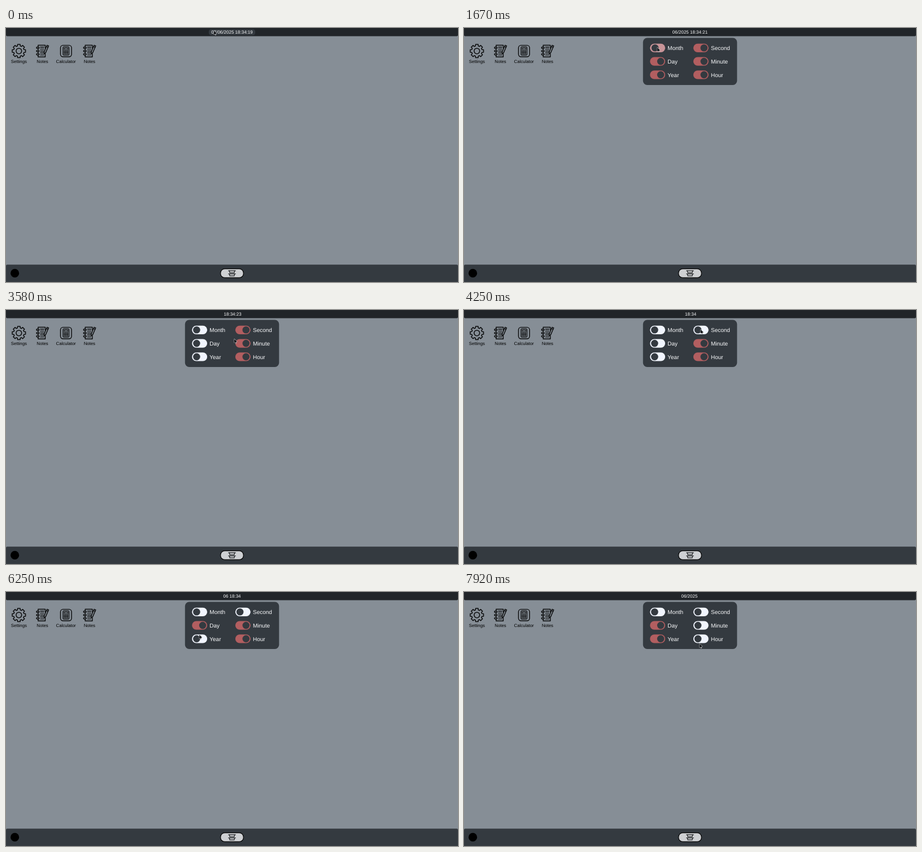
Animation, 800 px wide and 450 px high, one loop 8000 ms. Source, as an HTML page with a canvas:

```html
<!DOCTYPE html>
<html lang="en">
<head>
<meta charset="utf-8">
<title>Desktop clock settings</title>
<style>
html, body { margin: 0; width: 100%; height: 100%; overflow: hidden; background: #868e96; }
canvas { display: block; width: 800px; height: 450px; }
</style>
</head>
<body>
<canvas id="stage"></canvas>
<script>
const LOOP = 8000, FRAMES = 96, STEP = LOOP / FRAMES;
const FONT = 'px "Liberation Sans", Arial, sans-serif';
const DESK = '#868e96', BAR = '#343a40', TOP = '#212529', INK = '#090a0b', PALE = '#f8f9fa';
const ON = [178, 94, 96], OFF = [241, 245, 254];
const PANEL_OPEN = 160;

const canvas = document.getElementById('stage');
const ctx = canvas.getContext('2d');
const dpr = window.devicePixelRatio || 1;
canvas.width = 800 * dpr;
canvas.height = 450 * dpr;

// Every switch starts on and flips at its click times.
const clicks = { Month: [1570], Day: [2170, 5600], Year: [2830, 6550], Second: [3950], Minute: [7150], Hour: [7620] };
const switches = Object.entries(clicks).map(([name, flips], i) => ({
  name, flips,
  x: 329.2 + Math.floor(i / 3) * 76.7,
  y: 35.3 + (i % 3) * 23.8
}));

// The pointer goes from the clock to each click in turn, then leaves the panel.
const stops = [
  { t: 380, x: 368, y: 5 },
  ...switches.flatMap(s => s.flips.map(t => ({ t, x: s.x + 13, y: s.y - 0.5 }))),
  { t: LOOP, x: 417, y: 92 }
].sort((a, b) => a.t - b.t);

const clamp = v => Math.max(0, Math.min(1, v));
const smooth = v => v * v * (3 - 2 * v);
const mix = (a, b, k) => a + (b - a) * k;

// Rests after a click, travels in the middle of the gap; height lags behind.
function pointer(t) {
  const next = Math.max(1, stops.findIndex(s => s.t > t));
  const a = stops[next - 1], b = stops[next];
  const k = smooth(clamp(((t - a.t) / (b.t - a.t) - 0.45) / 0.31));
  return [mix(a.x, b.x, k), mix(a.y, b.y, k * k)];
}

const isOn = (s, t) => s.flips.filter(f => f <= t).length % 2 === 0;

// 1 is on, 0 is off
function level(s, t, duration) {
  const last = s.flips.filter(f => f <= t).pop();
  if (last === undefined) return 1;
  const k = smooth(clamp((t - last) / duration));
  return isOn(s, t) ? k : 1 - k;
}

function clockText(t) {
  const [month, day, year, second, minute, hour] = switches.map(s => isOn(s, t));
  const sec = 19 + Math.floor((t + 750) / 1000);
  const date = [month && '07', day && '06', year && '2025'].filter(Boolean).join('/');
  const time = [hour && '18', minute && '34', second && sec].filter(Boolean).join(':');
  return date + ' ' + time;
}

function text(str, x, y, size, color, align) {
  ctx.font = size + FONT;
  ctx.textRendering = 'geometricPrecision';
  ctx.textAlign = align;
  ctx.fillStyle = color;
  ctx.fillText(str, x, y);
}

function box(x, y, w, h, r, fill, stroke) {
  ctx.beginPath();
  ctx.roundRect(x, y, w, h, r);
  if (fill) { ctx.fillStyle = fill; ctx.fill(); }
  if (stroke) { ctx.strokeStyle = stroke; ctx.stroke(); }
}

function dot(x, y, r, color) {
  ctx.beginPath();
  ctx.arc(x, y, r, 0, Math.PI * 2);
  ctx.fillStyle = color;
  ctx.fill();
}

function line(...p) {
  ctx.beginPath();
  for (let i = 0; i < p.length; i += 2) ctx.lineTo(p[i], p[i + 1]);
  ctx.stroke();
}

function gear() {
  const teeth = 8, half = Math.PI / teeth;
  ctx.lineWidth = 1.5;
  ctx.beginPath();
  for (let i = 0; i < teeth * 2; i++) {
    const tip = i % 2 === 0;
    const r = tip ? 12 : 9.3, spread = tip ? 0.19 : 0.12;
    for (const side of [-1, 1]) {
      const a = i * half + side * spread;
      ctx.lineTo(Math.sin(a) * r, -Math.cos(a) * r);
    }
  }
  ctx.closePath();
  ctx.stroke();
  ctx.beginPath();
  ctx.arc(0, 0, 4.9, 0, Math.PI * 2);
  ctx.stroke();
}

function notes() {
  ctx.lineWidth = 1.4;
  line(5, -5, 5, -10.3, -7.7, -10.3, -7.7, 10.5, 5, 10.5, 5, 5);
  for (let i = -1; i <= 1; i++) box(-10.6, i * 5.8 - 1.2, 4.8, 2.4, 1.2, DESK, INK);
  for (let i = -2; i <= 2; i++) line(-3.6, i * 3.4, 2.6, i * 3.4);
  pencil();
}

function pencil() {
  ctx.save();
  ctx.translate(3.2, 5);
  ctx.rotate(0.41);
  ctx.fillStyle = DESK;
  ctx.beginPath();
  ctx.moveTo(0, 0);
  ctx.lineTo(-1.5, -3);
  ctx.lineTo(-1.5, -16);
  ctx.lineTo(1.5, -16);
  ctx.lineTo(1.5, -3);
  ctx.closePath();
  ctx.fill();
  ctx.stroke();
  line(-1.5, -13.4, 1.5, -13.4);
  ctx.restore();
}

function calculator() {
  ctx.lineWidth = 1.4;
  box(-9.7, -10.2, 19.6, 20.4, 4.5, null, INK);
  ctx.lineWidth = 1.2;
  box(-5.3, -7.4, 10.7, 14.8, 1.8, null, INK);
  box(-3.3, -5.3, 6.8, 2.5, 0.6, null, INK);
  for (let i = 0; i < 9; i++)
    box(-3.9 + (i % 3) * 2.8, -1.2 + Math.floor(i / 3) * 2.5, 2.2, 1.9, 0.5, INK);
}

const icons = [['Settings', gear], ['Notes', notes], ['Calculator', calculator], ['Notes', notes]];

function desktop() {
  ctx.fillStyle = DESK;
  ctx.fillRect(0, 0, 800, 450);
  ctx.lineCap = ctx.lineJoin = 'round';
  icons.forEach(([name, draw], i) => {
    const x = 22.8 + i * 41.67;
    ctx.save();
    ctx.translate(x, 40.8);
    ctx.strokeStyle = INK;
    draw();
    ctx.restore();
    text(name, x, 61.7, 7.8, '#000', 'center');
  });
  box(0, -4, 800, 18.5, 2.1, TOP);
  box(0, 419.2, 800, 36, 2.1, BAR);
  dot(15.6, 434.4, 7.6, '#000');
  dock();
}

function dock() {
  ctx.lineWidth = 1.2;
  box(379.7, 426.7, 40.6, 15.7, 7.4, '#ced0d3', '#000');
  ctx.strokeStyle = '#1b1d20';
  for (const y of [430.2, 435.6]) {
    line(393.8, y, 406.2, y);
    line(395.4, y, 396, y + 3.5, 404, y + 3.5, 404.6, y);
  }
}

function toggle(s, t) {
  const tint = level(s, t, 240);
  const rgb = OFF.map((c, i) => Math.round(mix(c, ON[i], tint)));
  box(s.x, s.y - 7.6, 26.9, 15.2, 7.6, `rgb(${rgb})`);
  dot(s.x + mix(8.2, 18.9, level(s, t, 115)), s.y, 6.3, BAR);
  text(s.name, s.x + 31.1, s.y + 3.6, 10, PALE, 'left');
}

function arrow(x, y) {
  ctx.save();
  ctx.translate(x, y);
  ctx.lineWidth = 2;
  ctx.strokeStyle = '#d5d7da';
  line(1.6, 4, 3, 7);
  ctx.beginPath();
  ctx.moveTo(0, 0);
  ctx.lineTo(0, 6.6);
  ctx.lineTo(4.8, 4.6);
  ctx.closePath();
  ctx.lineWidth = 0.8;
  ctx.stroke();
  ctx.fillStyle = ctx.strokeStyle = '#16181b';
  ctx.fill();
  line(1.6, 4, 3, 7);
  ctx.restore();
}

function render(t) {
  ctx.setTransform(dpr, 0, 0, dpr, 0, 0);
  const [x, y] = pointer(t);
  desktop();
  if (y < 14) box(358.8, 2.2, 82.4, 10.6, 4.2, BAR);
  text(clockText(t), 400, 10.1, 8, PALE, 'center');
  if (t >= PANEL_OPEN) {
    box(316.8, 17.5, 166.5, 83.4, 7.5, BAR);
    switches.forEach(s => toggle(s, t));
  }
  arrow(x, y);
}

const start = performance.now();
function tick() {
  const t = performance.now() - start;
  render(Math.floor((t + 5) / STEP) % FRAMES * STEP);
  requestAnimationFrame(tick);
}
tick();
</script>
</body>
</html>
```
